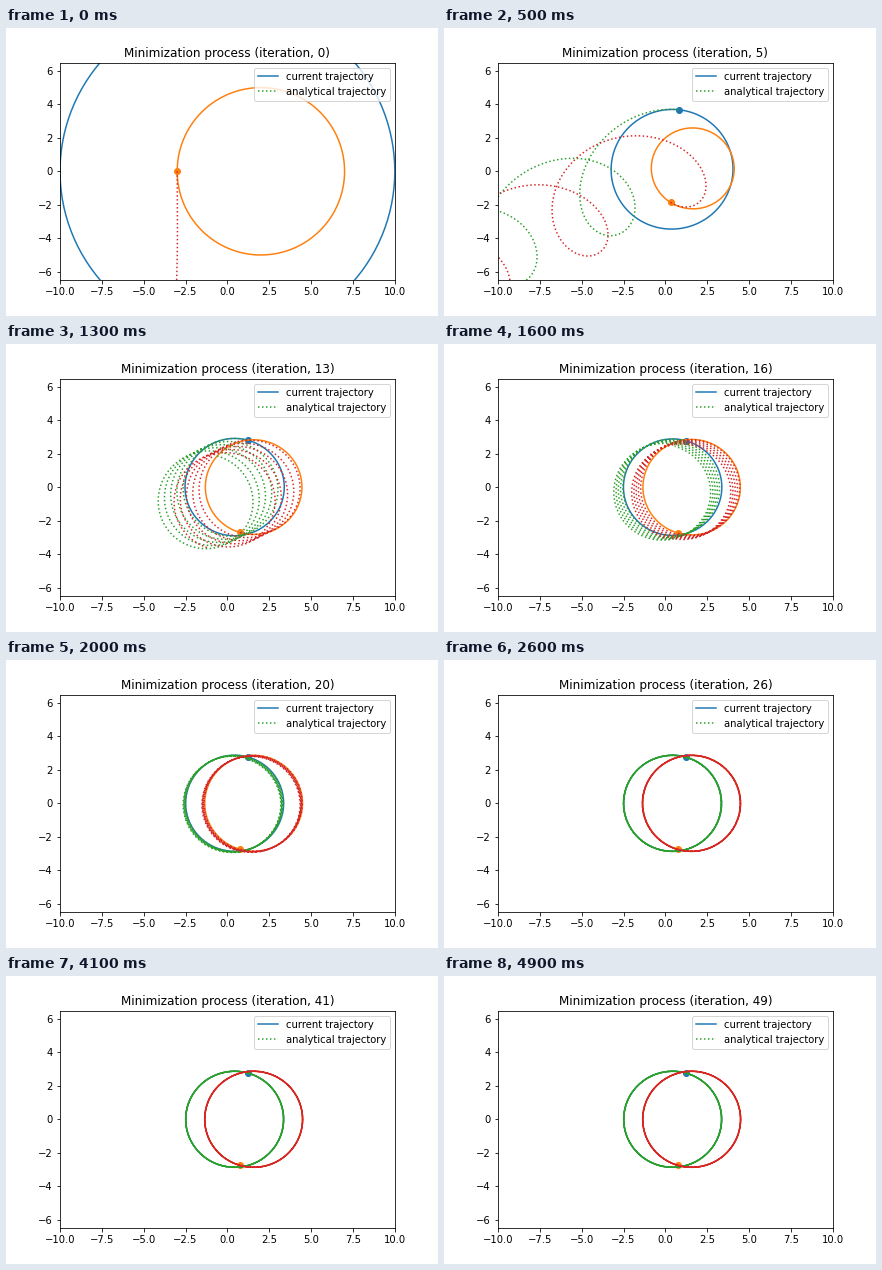
Animation of 432x288 px, one loop 5 s. Source, as a matplotlib script:

```python
import numpy as np
import matplotlib.pyplot as plt
from matplotlib.animation import FuncAnimation

ITERATIONS = 50
RATE = 0.289          # gradient step
GRAVITY = 25.0        # pull on each body, measured from the shared centre
PERIODS = 5
STEPS = 500           # integration steps per period
SAMPLES = 256
MAX_MODE = 10

modes = np.fft.fftfreq(SAMPLES, 1 / SAMPLES)
kept = np.abs(modes) <= MAX_MODE
rates = RATE / np.maximum(1, modes**2 / 4)
phase = np.exp(1j * np.linspace(0, 2 * np.pi, SAMPLES, endpoint=False))


def pull(z):
    return -GRAVITY * z / np.abs(z)**3


def minimize_action():
    """Fourier coefficients of the half separation at each descent step."""
    coefs = np.zeros(SAMPLES, complex)
    coefs[0], coefs[1] = -1, 2.5 + 5j
    history = []
    for _ in range(ITERATIONS):
        history.append(coefs)
        force = np.fft.fft(pull(np.fft.ifft(coefs) * SAMPLES)) / SAMPLES
        gradient = modes**2 * coefs + force
        coefs = np.where(kept, coefs - rates * gradient, 0)
    return np.array(history)


def integrate(z, v):
    """Runge-Kutta solution for all iterations at once."""
    h = 2 * np.pi / STEPS
    path = [z]
    for _ in range(PERIODS * STEPS):
        a1 = pull(z)
        v2 = v + h / 2 * a1
        a2 = pull(z + h / 2 * v)
        v3 = v + h / 2 * a2
        a3 = pull(z + h / 2 * v2)
        v4 = v + h * a3
        a4 = pull(z + h * v3)
        z = z + h / 6 * (v + 2 * v2 + 2 * v3 + v4)
        v = v + h / 6 * (a1 + 2 * a2 + 2 * a3 + a4)
        path.append(z)
    return np.array(path).T


coefs = minimize_action()
half = np.fft.ifft(coefs, axis=1) * SAMPLES
sway = (-2.5 + 5j) * (1 - RATE)**np.arange(ITERATIONS)[:, None]
centre = 1 + sway * phase
current = [np.c_[z, z[:, :1]] for z in (centre + half, centre - half)]

orbit = integrate(coefs.sum(axis=1), (1j * modes * coefs).sum(axis=1))
times = np.linspace(0, 2 * np.pi * PERIODS, PERIODS * STEPS + 1)
drift = 1 + sway * (1 + 1j * times)
analytical = [drift + orbit, drift - orbit]

fig, ax = plt.subplots(figsize=(6, 4), dpi=72)
fig.subplots_adjust(left=0.125, right=0.9, bottom=0.125, top=0.88)
half_height = 10 * (4 * 0.755) / (6 * 0.775)
ax.set_xlim(-10, 10)
ax.set_ylim(-half_height, half_height)
title = ax.set_title("")

solid = [ax.plot([], [], color=c)[0] for c in ("C0", "C1")]
dotted = [ax.plot([], [], ":", color=c)[0] for c in ("C2", "C3")]
dots = [ax.scatter([0], [0], color=c) for c in ("C0", "C1")]
ax.legend([solid[0], dotted[0]],
          ["current trajectory", "analytical trajectory"],
          loc="upper right")


def update(i):
    title.set_text(f"Minimization process (iteration, {i})")
    for line, paths in zip(solid + dotted, current + analytical):
        line.set_data(paths[i].real, paths[i].imag)
    for dot, paths in zip(dots, current):
        start = paths[i, 0]
        dot.set_offsets([[start.real, start.imag]])
    return [title, *solid, *dotted, *dots]


anim = FuncAnimation(fig, update, frames=ITERATIONS, interval=100,
                     repeat=True, repeat_delay=0, blit=False)
plt.show()
```
